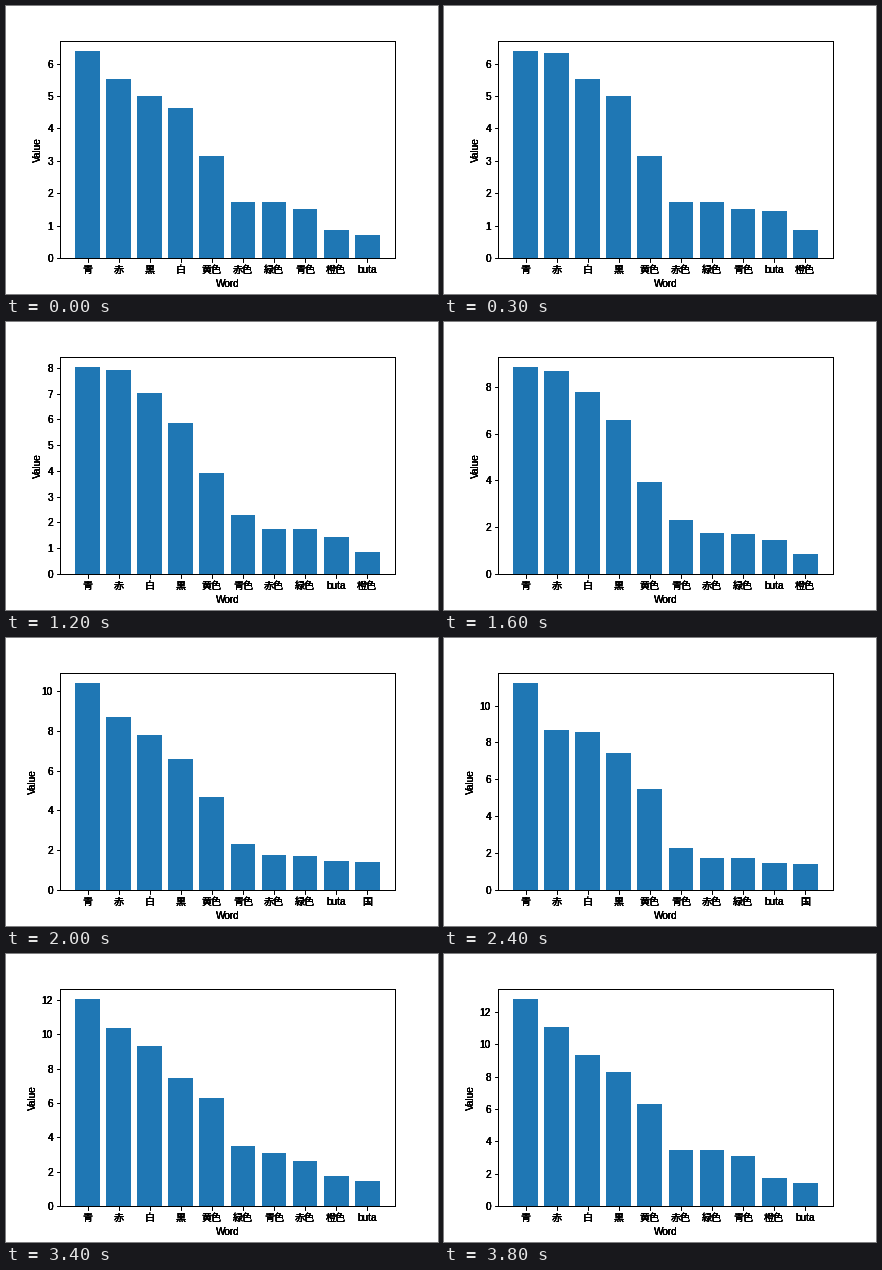
Write a matplotlib script that moves like this. It is 432x288 px and loops after 3900 ms.

```python
import matplotlib.pyplot as plt
from matplotlib.animation import FuncAnimation

plt.rcParams["font.family"] = ["Liberation Sans", "Noto Sans CJK JP"]
plt.rcParams["font.size"] = 10

TOP = 10
LAYERS = 5  # stacked copies of the axes give the heavy, dense lettering

START = {
    "青": 6.39, "赤": 5.52, "黒": 5.00, "白": 4.63, "黄色": 3.15, "赤色": 1.74,
    "緑色": 1.73, "青色": 1.52, "橙色": 0.87, "buta": 0.71, "国": 0.69,
}

# One word gains score on every step.
HITS = [
    ("赤", .80), ("buta", .74), ("白", .89), ("赤", .80), ("青", .77), ("赤", .81),
    ("白", .76), ("青色", .77), ("黒", .86), ("青", .88), ("黄色", .77), ("白", .75),
    ("青", .81), ("黒", .72), ("赤", .76), ("白", .76), ("青", .83), ("黄色", .75),
    ("国", .71), ("青", .72), ("黄色", .81), ("青", .83), ("白", .77), ("黒", .87),
    ("緑色", .88), ("青", .83), ("赤色", .88), ("黄色", .81), ("赤", .84), ("赤", .84),
    ("白", .76), ("緑色", .87), ("橙色", .88), ("青色", .79), ("黒", .84), ("赤色", .87),
    ("青", .74), ("赤", .70),
]


def ranking(step):
    scores = dict(START)
    for word, gain in HITS[:step]:
        scores[word] += gain
    return sorted(scores.items(), key=lambda item: -item[1])[:TOP]


fig = plt.figure(figsize=(6, 4), dpi=72, facecolor="white")
layers = []
for i in range(LAYERS):
    ax = fig.add_axes([0.125, 0.125, 0.775, 0.755], label=f"layer{i}")
    ax.set_xlim(-0.89, TOP - 0.11)
    ax.set_xticks(range(TOP))
    ax.set_xlabel("Word")
    ax.set_ylabel("Value")
    if i:
        ax.patch.set_visible(False)
    layers.append(ax)
bars = layers[0].bar(range(TOP), [0] * TOP, color="#1f77b4")


def update(step):
    words, values = zip(*ranking(step))
    for bar, value in zip(bars, values):
        bar.set_height(value)
    for ax in layers:
        ax.set_ylim(0, values[0] * 1.05)
        ax.set_xticklabels(words)
    return []


anim = FuncAnimation(fig, update, frames=len(HITS) + 1, interval=100,
                     init_func=lambda: update(0), repeat=True, repeat_delay=0)
plt.show()
```
